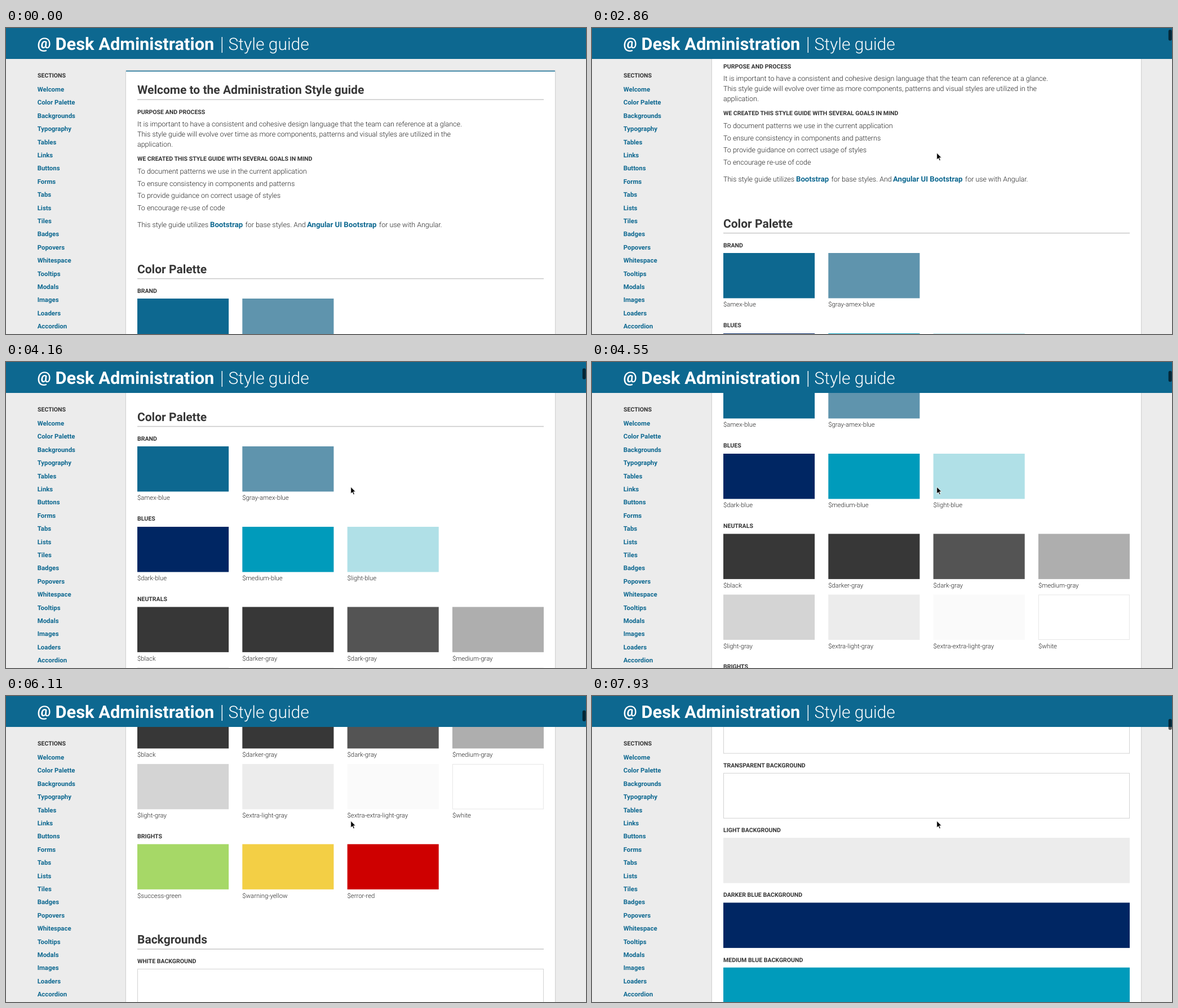
Write an HTML page that moves like this. It is 1029 px wide and 544 px high and loops after 8 s.

```html
<!DOCTYPE html>
<html lang="en">
<head>
<meta charset="utf-8">
<title>Style guide</title>
<style>
  html, body { margin: 0; width: 100%; height: 100%; overflow: hidden; background: #ececec; }
  svg { display: block; width: 100%; height: 100%; }
  text { font-family: Roboto, "Open Sans", Arial, sans-serif; text-rendering: geometricPrecision; }
  .at { font-size: 27px; font-weight: 700; fill: #fff; }
  .title { font-size: 30.8px; font-weight: 700; fill: #fff; }
  .subtitle { font-size: 30px; font-weight: 300; fill: #fff; }
  .nav { font-size: 11.4px; font-weight: 700; fill: #0d6890; }
  .label { font-size: 10.55px; font-weight: 700; fill: #333; }
  .head { font-size: 21px; font-weight: 700; fill: #373737; }
  .body { font-size: 12.49px; font-weight: 300; fill: #222; }
  .link { font-size: 13.2px; font-weight: 700; fill: #0d6890; }
  .var { font-size: 11.3px; font-weight: 300; fill: #222; }
</style>
</head>
<body>
<svg id="stage" viewBox="0 0 1029 544" preserveAspectRatio="none">
  <defs>
    <filter id="shadow" x="-5%" width="110%" y="-1%" height="102%">
      <feDropShadow dx="0" dy="0" stdDeviation="1.3" flood-color="#000" flood-opacity=".3"/>
    </filter>
  </defs>
  <rect width="1029" height="544" fill="#ececec"/>
  <g id="page"></g>
  <g id="side"></g>
  <g id="bar"></g>
  <rect id="thumb" x="1022.7" width="6" height="19.5" rx="3" fill="#000" fill-opacity=".62"/>
  <path id="cursor" d="M0 0V12.2L2.8 9.6L4.7 14L6.7 13.1L4.8 8.8H8.6Z" fill="#000" stroke="#fff" stroke-width=".9"/>
</svg>
<script>
const NS = 'http://www.w3.org/2000/svg';
const $ = id => document.getElementById(id);
const page = $('page'), side = $('side'), bar = $('bar');
const thumb = $('thumb'), cursor = $('cursor');
const BLUE = '#0d6890', NAVY = '#002663', TEAL = '#009bbb', PALE = '#ececec';

function add(parent, tag, attrs, text) {
  const el = document.createElementNS(NS, tag);
  for (const k in attrs) el.setAttribute(k, attrs[k]);
  if (text) el.textContent = text;
  parent.appendChild(el);
}
const write = (parent, cls, x, y, text) => add(parent, 'text', { class: cls, x, y }, text);
const box = (parent, x, y, width, height, fill, more) =>
  add(parent, 'rect', { x, y, width, height, fill, ...more });
const framed = (x, y, w, h, stroke) => box(page, x + .5, y + .5, w - 1, h - 1, '#fff', { stroke });

function heading(y, text) {
  write(page, 'head', 233, y, text);
  box(page, 233, y + 9.2, 721, 1.6, '#cbcbcb');
}

// Each swatch is "name colour"
function swatches(y, ...items) {
  items.forEach((item, i) => {
    const [name, fill] = item.split(' ');
    const x = 233 + i * 186.3;
    if (name === 'white') framed(x, y, 162, 80.5, '#e6e6e6');
    else box(page, x, y, 162.1, 80.4, fill);
    write(page, 'var', x, y + 95.3, '$' + name);
  });
}

// Scrolling panel
box(page, 213, 75.8, 761, 2400, '#fff', { filter: 'url(#shadow)' });
box(page, 213, 75.8, 761, 1.5, BLUE);

heading(117.3, 'Welcome to the Administration Style guide');
write(page, 'label', 233, 152.6, 'PURPOSE AND PROCESS');
[
  'It is important to have a consistent and cohesive design language that the team can reference at a glance.',
  'This style guide will evolve over time as more components, patterns and visual styles are utilized in the',
  'application.'
].forEach((s, i) => write(page, 'body', 233, 175 + i * 17.8, s));
write(page, 'label', 233, 236.3, 'WE CREATED THIS STYLE GUIDE WITH SEVERAL GOALS IN MIND');
[
  'To document patterns we use in the current application',
  'To ensure consistency in components and patterns',
  'To provide guidance on correct usage of styles',
  'To encourage re-use of code'
].forEach((s, i) => write(page, 'body', 233, 258.7 + i * 21.8, s));
write(page, 'body', 233, 353.8, 'This style guide utilizes');
write(page, 'link', 362, 353.8, 'Bootstrap');
write(page, 'body', 424.5, 353.8, 'for base styles. And');
write(page, 'link', 534, 353.8, 'Angular UI Bootstrap');
write(page, 'body', 662, 353.8, 'for use with Angular.');

heading(435.6, 'Color Palette');
write(page, 'label', 233, 471, 'BRAND');
swatches(481, 'amex-blue ' + BLUE, 'gray-amex-blue #5f94ad');
write(page, 'label', 233, 613.4, 'BLUES');
swatches(624, 'dark-blue ' + NAVY, 'medium-blue ' + TEAL, 'light-blue #b0e0e7');
write(page, 'label', 233, 756.3, 'NEUTRALS');
swatches(766.5, 'black #373737', 'darker-gray #373737', 'dark-gray #545454', 'medium-gray #aeaeae');
swatches(874.5, 'light-gray #d4d4d4', 'extra-light-gray ' + PALE, 'extra-extra-light-gray #fafafa', 'white');
write(page, 'label', 233, 1006.4, 'BRIGHTS');
swatches(1017, 'success-green #a6d867', 'warning-yellow #f3cf45', 'error-red #ce0000');

heading(1193.5, 'Backgrounds');
['WHITE #fff', 'TRANSPARENT #fff', 'LIGHT ' + PALE, 'DARKER BLUE ' + NAVY, 'MEDIUM BLUE ' + TEAL].forEach((item, i) => {
  const cut = item.lastIndexOf(' '), fill = item.slice(cut + 1), y = 1238.5 + i * 115.3;
  write(page, 'label', 233, y - 10.2, item.slice(0, cut) + ' BACKGROUND');
  if (fill === '#fff') framed(233, y, 721, 81, '#d2d2d2');
  else box(page, 233, y, 721, 80.5, fill);
});

// Fixed parts
write(side, 'label', 56, 88.2, 'SECTIONS');
('Welcome,Color Palette,Backgrounds,Typography,Tables,Links,Buttons,Forms,Tabs,Lists,Tiles,Badges,' +
 'Popovers,Whitespace,Tooltips,Modals,Images,Loaders,Accordion').split(',')
  .forEach((s, i) => write(side, 'nav', 55.7, 113 + i * 23.4, s));
box(bar, 0, 0, 1029, 55, BLUE);
write(bar, 'at', 55.5, 35.5, '@');
write(bar, 'title', 87.5, 38.5, 'Desk Administration');
box(bar, 382.6, 16, 1.4, 28, '#fff');
write(bar, 'subtitle', 394.5, 38.5, 'Style guide');

// Scroll position by tick, joined by a monotone cubic
const TICK = 130, LOOP = 8000;
const keys = [[17, 0], [22, 81], [24, 127], [28, 195], [31, 285], [35, 461], [37, 470],
  [38, 470], [41, 592], [45, 676], [52, 940], [54, 946], [61, 1217]];
const slope = i => (keys[i + 1][1] - keys[i][1]) / (keys[i + 1][0] - keys[i][0]);
function tangent(i) {
  if (i === 0 || i === keys.length - 1) return slope(i ? i - 1 : 0);
  const a = slope(i - 1), b = slope(i);
  return a * b > 0 ? 2 * a * b / (a + b) : 0;
}
function scrollAt(n) {
  if (n <= keys[0][0]) return 0;
  const i = keys.findIndex(k => k[0] >= n) - 1;
  if (i < 0) return keys[keys.length - 1][1];
  const [n0, a] = keys[i], [n1, b] = keys[i + 1];
  const w = n1 - n0, u = (n - n0) / w, v = 1 - u;
  return a * v * v * (1 + 2 * u) + b * u * u * (3 - 2 * u) +
    w * u * v * (tangent(i) * v - tangent(i + 1) * u);
}

function draw(ms) {
  const n = Math.floor(ms / TICK);
  const y = scrollAt(n);
  page.setAttribute('transform', `translate(0 ${-y})`);
  thumb.setAttribute('y', y / 30 + .3);
  thumb.style.display = n >= 18 ? '' : 'none';
  const rest = 1 - Math.min(1, Math.max(0, (n - 2) / 3));
  cursor.style.display = n >= 2 ? '' : 'none';
  cursor.setAttribute('transform', `translate(${611.7 + 9 * rest} ${222 - 220 * rest * rest})`);
}

const start = performance.now();
function loop() {
  draw((performance.now() - start) % LOOP);
  requestAnimationFrame(loop);
}
loop();
</script>
</body>
</html>
```
